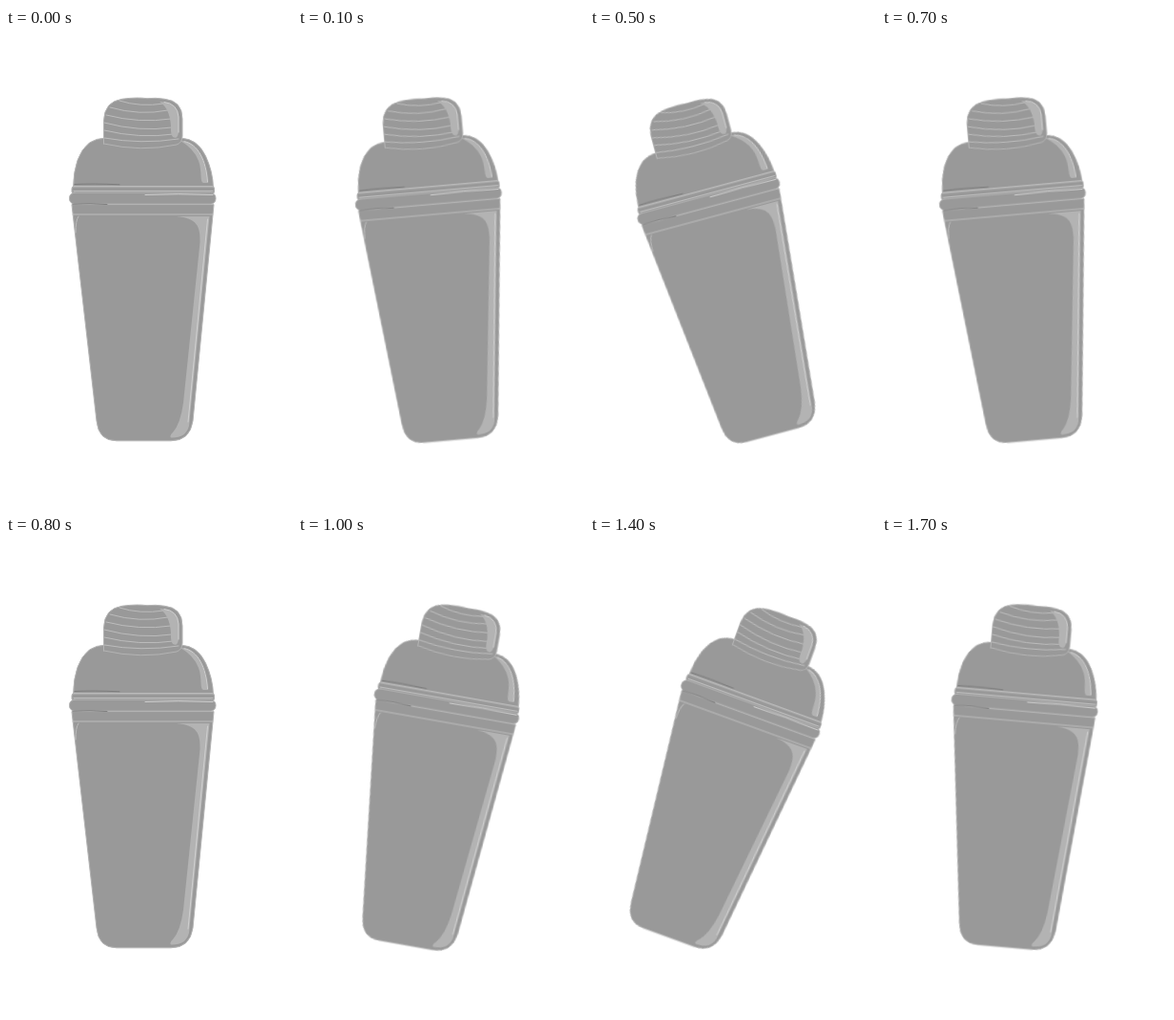
An HTML page that plays this animation: 300x501 px, repeating every 1800 ms.

```html
<!DOCTYPE html>
<html lang="en">
<head>
<meta charset="utf-8">
<title>Shaker</title>
<style>
  html, body { margin: 0; width: 100%; height: 100%; overflow: hidden; background: #fff; }
  svg { display: block; width: 100vw; height: 100vh; }
  #shaker { transform-origin: 144.5px 251px; }
  .metal { fill: #999; stroke: #b4b4b4; stroke-width: 1; }
  .shine { fill: #b3b3b3; }
  .line { fill: none; stroke: #bcbcbc; stroke-width: 1; }
  .glint { fill: none; stroke: #d0d0d0; stroke-width: 1; }
  .dark { fill: none; stroke: #7d7d7d; stroke-width: 1; }
</style>
</head>
<body>
<svg viewBox="0 0 300 501">
  <g id="shaker" stroke-linecap="round" stroke-linejoin="round">
    <!-- body -->
    <path class="metal" d="M69 185 L95 411 Q97 431.800 116 431.800 L173 431.800 Q193 431.800 196 411 L218 185 Z"/>
    <path class="line" d="M70 195 H217 M73 214 Q73 201 76 197"/>
    <path class="shine" d="M179 197 H213.500 L192 416 Q189 429 173 428.500 Q171 427 175 423 Q183 414 186 392 L203.500 224 C204 207 200 199 179 197 Z"/>
    <path class="glint" d="M211.500 200 L191 412"/>
    <!-- shoulder -->
    <path class="metal" d="M70.500 167 Q71 133 87.500 120 Q95 115.200 104 115.200 H184 Q201 116 209.500 134 Q217 150 217.500 167 Z"/>
    <path class="shine" d="M183 118 C198 118 210 135 211.500 162 H207 C203 161 206 150 202 139 Q197 126 183 118 Z"/>
    <path class="glint" d="M187 118.700 C201 121 210 138 211.500 161"/>
    <rect class="metal" x="69" y="165.500" width="149.500" height="8" rx="2.500"/>
    <path class="line" d="M71 166 H217 M71 170.500 H217"/>
    <path class="dark" d="M72 163.500 Q91 162.500 119 163.800"/>
    <!-- ring -->
    <rect class="metal" x="66.500" y="172.200" width="153.500" height="12" rx="5.500"/>
    <path class="glint" d="M146 174.500 Q180 173 217 174.500"/>
    <path class="dark" d="M70 184.200 Q88 183.200 106 184.500"/>
    <!-- cap -->
    <path class="metal" d="M102.500 121 V97 Q103 77 122 74.200 Q138 72.200 148 73.700 Q157 72.700 166 74.200 Q185 76 185 95 V113 Q185 120 179 122 Q142 130 102.500 121 Z"/>
    <path class="line" d="M119 76 Q140 83 166 79 M109 83 Q140 92 170 86 M105 91 Q140 100 173 95 M103 99 Q140 109 174 104 M103 107 Q140 116 176 111 M103 115 Q142 122 181 116"/>
    <path class="shine" d="M161 77 Q180 78 181 93 V109 Q180 117 175 114 Q172.500 111 173 103 Q172 84 161 77 Z"/>
    <path class="glint" d="M166 77.500 Q180 79 181 93 V109"/>
  </g>
</svg>
<script>
  const STEP = 5, COUNT = 18, LOOP = 1800;

  // Swing left for eight ticks, then further right for ten.
  const angle = i => i < 8 ? -STEP * Math.min(i, 8 - i) : STEP * Math.min(i - 8, COUNT - i);

  const poses = Array.from({ length: COUNT + 1 }, (_, i) => ({
    offset: i / COUNT,
    transform: `rotate(${angle(i)}deg)`,
    easing: 'steps(1, end)'
  }));

  document.getElementById('shaker').animate(poses, { duration: LOOP, iterations: Infinity });
</script>
</body>
</html>
```
